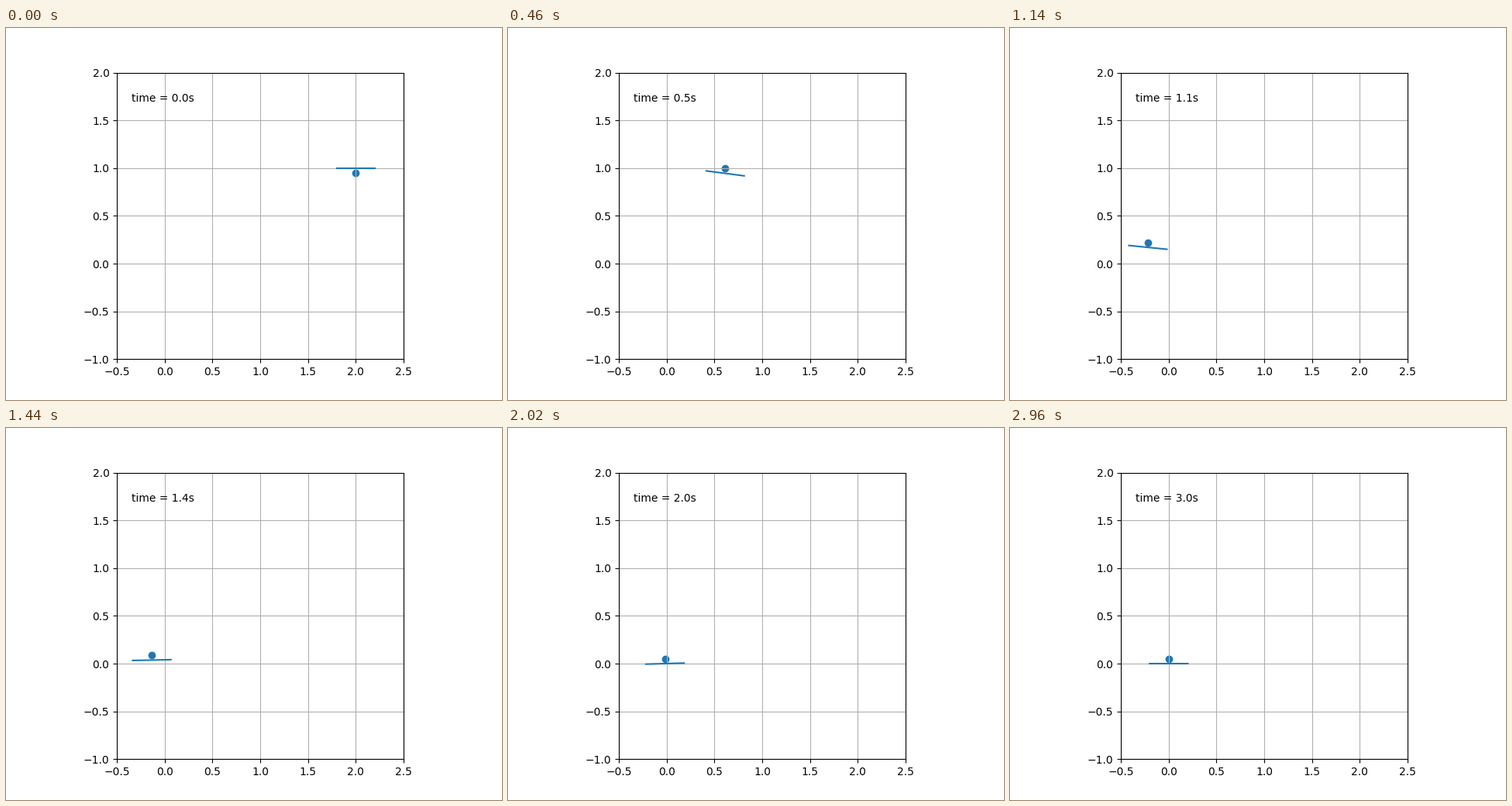
Write a matplotlib script that moves like this. It is 640 px wide and 480 px high and loops after 3020 ms.

```python
import numpy as np
import matplotlib.pyplot as plt
from matplotlib.animation import FuncAnimation

DT = 0.02
STEPS = 151
ARM = 0.2
HUB = 0.05

# Key poses (time, x, y, tilt): flip over, dash left, brake, settle
POSES = [
    (0.00, 2.000, 1.000, np.pi),
    (0.10, 1.900, 1.015, 1.45),
    (0.20, 1.570, 1.110, 0.82),
    (0.46, 0.613, 0.945, -0.13),
    (0.58, 0.216, 0.630, -0.51),
    (0.82, -0.207, 0.278, -0.415),
    (0.98, -0.239, 0.245, -0.23),
    (1.14, -0.218, 0.170, -0.10),
    (1.44, -0.136, 0.037, 0.02),
    (2.02, -0.018, 0.000, 0.028),
    (3.00, 0.000, 0.000, 0.0),
]


def glide(poses, t):
    """Cubic Hermite path through the poses, at rest at both ends."""
    keys = np.array(poses)
    knots, values = keys[:, 0], keys[:, 1:]
    slopes = np.gradient(values, knots, axis=0)
    slopes[[0, -1]] = 0
    k = np.clip(np.searchsorted(knots, t, side="right") - 1, 0, len(knots) - 2)
    h = (knots[k + 1] - knots[k])[:, None]
    s = (t - knots[k])[:, None] / h
    blend = s * s * (3 - 2 * s)
    return ((1 - blend) * values[k] + blend * values[k + 1]
            + h * s * (1 - s) * ((1 - s) * slopes[k] - s * slopes[k + 1]))


times = np.arange(STEPS) * DT
path = glide(POSES, times)

fig, ax = plt.subplots(figsize=(6.4, 4.8), dpi=100)
ax.set_aspect("equal")
ax.set(xlim=(-0.5, 2.5), ylim=(-1, 2),
       xticks=np.arange(-0.5, 2.6, 0.5), yticks=np.arange(-1, 2.1, 0.5))
ax.grid()

body, = ax.plot([], [], color="C0", lw=1.5)
hub, = ax.plot([], [], "o", color="C0", ms=6, zorder=1)  # under the grid
clock = ax.text(0.05, 0.9, "", transform=ax.transAxes)


def update(i):
    x, y, tilt = path[i]
    dx, dy = ARM * np.cos(tilt), ARM * np.sin(tilt)
    body.set_data([x - dx, x + dx], [y - dy, y + dy])
    hub.set_data([x], [y + HUB * np.cos(tilt)])
    clock.set_text(f"time = {times[i]:.1f}s")
    return body, hub, clock


anim = FuncAnimation(fig, update, frames=STEPS, interval=20, repeat=True,
                     repeat_delay=0)
plt.show()
```
